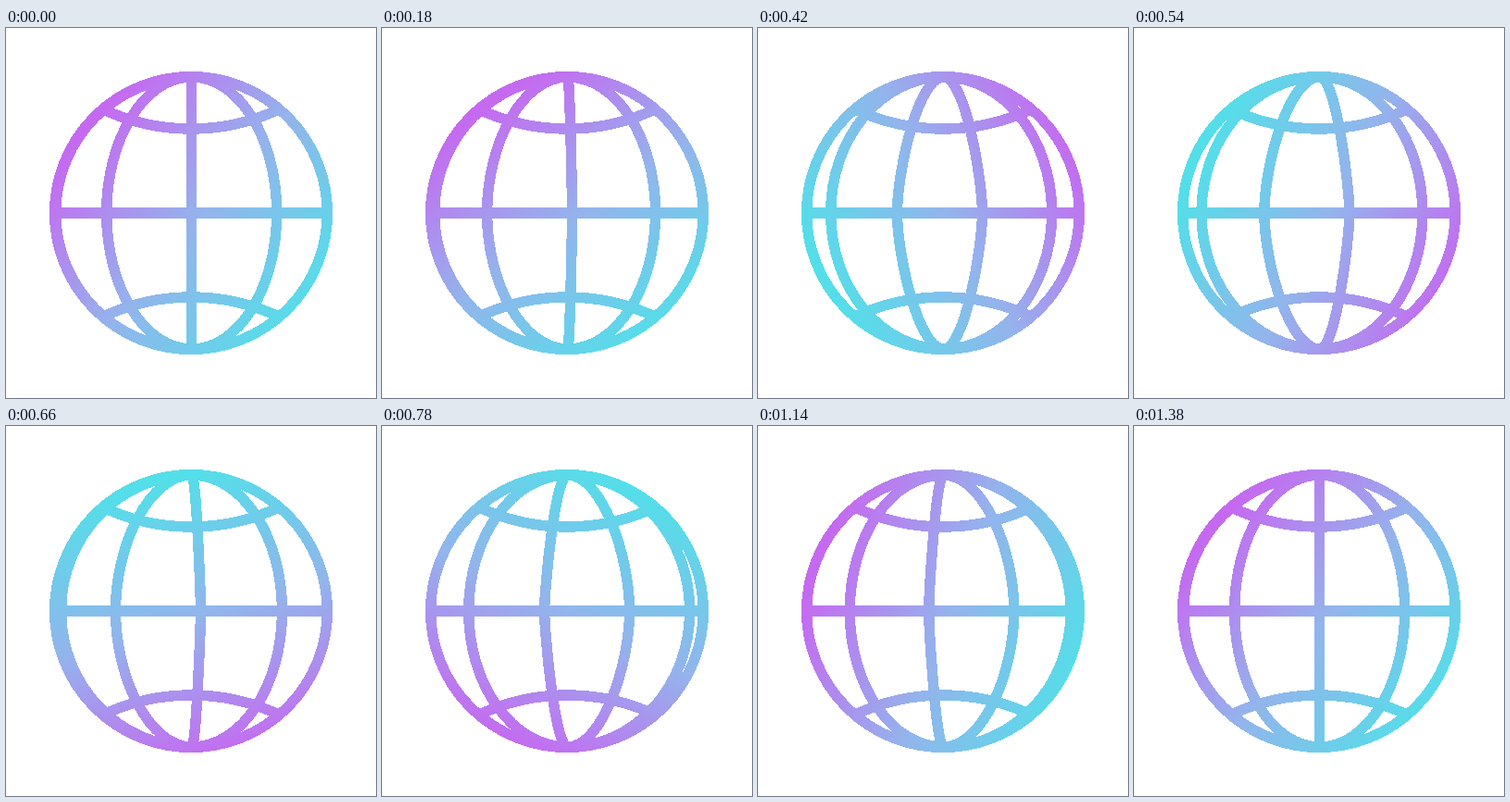
These frames come from a looping animation (400x400 px, 3.41 s). An HTML page:

```html
<!DOCTYPE html>
<html>
<head>
<meta charset="utf-8">
<style>
html, body { margin: 0; width: 100%; height: 100%; overflow: hidden; background: #fff }
svg { display: block; width: 100%; height: 100% }
</style>
</head>
<body>
<svg viewBox="0 0 400 400" shape-rendering="crispEdges">
  <defs>
    <linearGradient id="hue" gradientUnits="userSpaceOnUse" x1="54" y1="207" x2="364" y2="207">
      <stop offset="0" stop-color="#53dfe9"/>
      <stop offset=".5" stop-color="#93b4ec"/>
      <stop offset="1" stop-color="#c56af0"/>
    </linearGradient>
  </defs>
  <g fill="none" stroke="url(#hue)" stroke-width="11.4">
    <circle cx="200" cy="200" r="147.4"/>
    <path d="M53 200H347M105 88A225 225 0 0 0 295 88M105 312A225 225 0 0 1 295 312"/>
    <path id="meridians"/>
  </g>
</svg>
<script>
const LOOP = 3410, SPIN = 1380, STEP = 30;
const R = 147, INNER = 92, ROUND = .5523, CX = 200.7;
const stops = [-R, -INNER, 0, INNER, R];
const hue = document.getElementById('hue');
const meridians = document.getElementById('meridians');

// Speeds up to height m at the join, then slows down with power q; smooth at the join.
function ease(u, m, q) {
  const join = .24;
  const p = q * (1 - m) * join / ((1 - join) * m);
  return u < join ? m * (u / join) ** p : 1 - (1 - m) * ((1 - u) / (1 - join)) ** q;
}

// Half an ellipse whose side handles shrink as it straightens.
function meridian(x) {
  const side = ROUND * R * Math.min(1, Math.abs(x) / INNER);
  const tip = CX + ROUND * x, edge = CX + x;
  return `M${CX} ${200 - R}C${tip} ${200 - R} ${edge} ${200 - side} ${edge} 200` +
    `S${tip} ${200 + R} ${CX} ${200 + R}`;
}

function draw(now) {
  const t = Math.floor((now - start) % LOOP / STEP) * STEP;
  const u = Math.min(1, t / SPIN);
  const p = 5 * ease(u, .14, 2.18) % 1;
  meridians.setAttribute('d', stops.slice(0, 4)
    .map((x, i) => meridian(x + (stops[i + 1] - x) * p)).join(''));
  const angle = 220 + 360 * ease(u, .19, 1.85);
  hue.setAttribute('gradientTransform', `rotate(${angle} 209 207)`);
}

function tick() {
  draw(performance.now());
  requestAnimationFrame(tick);
}

const start = performance.now();
tick();
</script>
</body>
</html>
```
